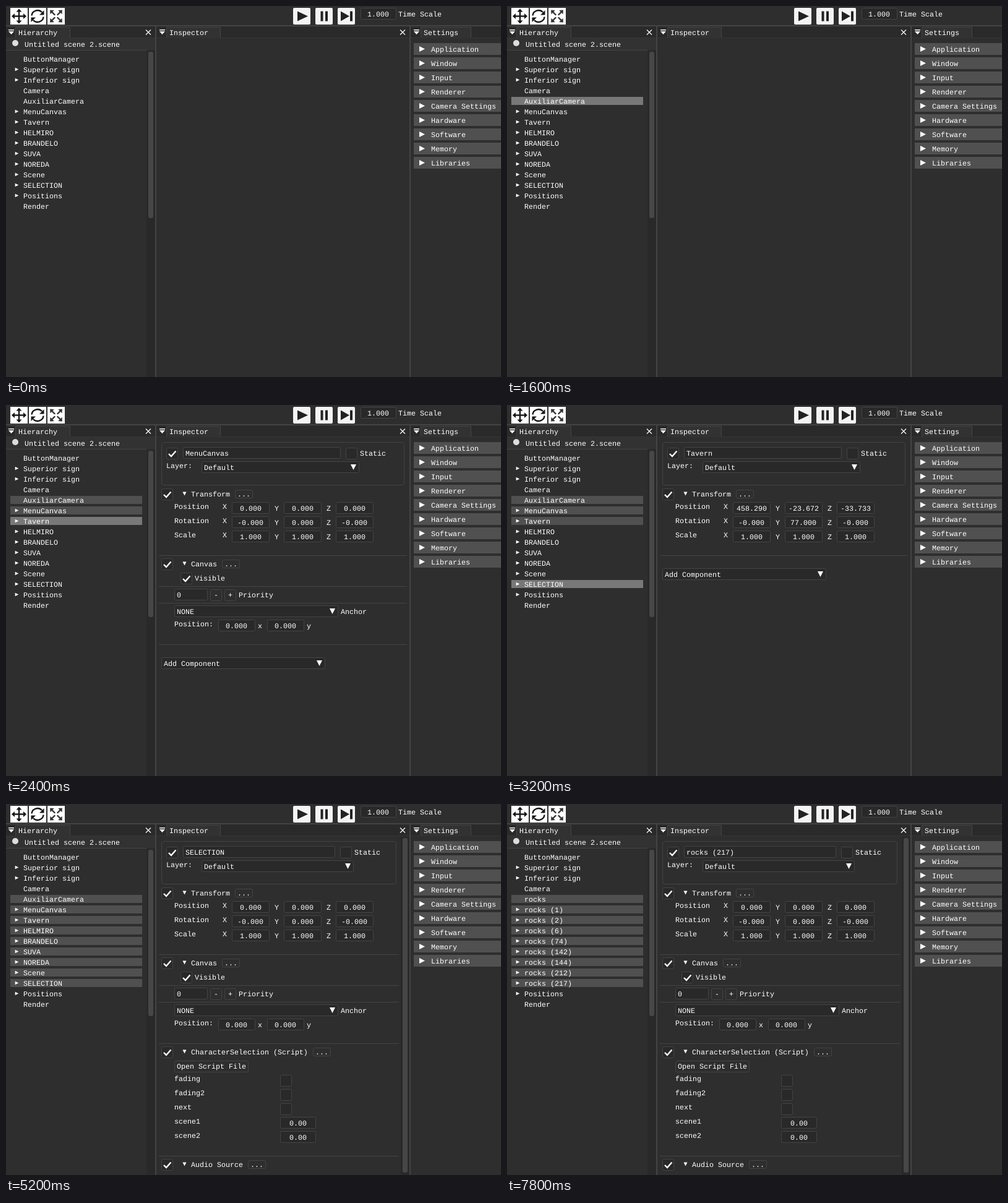
Write an HTML page that moves like this. It is 800 by 600 pixels and loops after 8000 ms.

```html
<!DOCTYPE html>
<html lang="en">
<head>
<meta charset="utf-8">
<title>Scene editor</title>
<style>
html, body { margin: 0; width: 100%; height: 100%; overflow: hidden; background: #2e2e2e; }
svg { display: block; width: 800px; height: 600px; }
text { font: 11.667px "Liberation Mono", monospace; fill: #fff; white-space: pre; text-rendering: geometricPrecision; }
</style>
</head>
<body>
<svg viewBox="0 0 800 600">
  <g id="base"></g>
  <g id="tree"></g>
  <g id="inspector"></g>
</svg>
<script>
const LOOP = 8000, CHAR = 7;
const BG = '#2e2e2e', FRAME = '#292929', BORDER = '#444', HEADER = '#505050', HOVER = '#787878';

// Primitives; text and controls are placed by their vertical centre.
const rect = (x, y, w, h, fill, more = '') =>
  `<rect x="${x}" y="${y}" width="${w}" height="${h}" fill="${fill}" ${more}/>`;
const path = (d, fill = '#fff', more = '') => `<path d="${d}" fill="${fill}" ${more}/>`;
const text = (x, cy, s) => `<text x="${x}" y="${cy + 4}">${s}</text>`;
const box = (x, y, w, h, fill = FRAME, r = 2) =>
  rect(x + .5, y + .5, w - 1, h - 1, fill, `stroke="${BORDER}" rx="${r}"`);
const right = (x, cy, r) => path(`M${x - r} ${cy - r}L${x + r} ${cy}L${x - r} ${cy + r}Z`);
const down = (x, cy, r) => path(`M${x - r} ${cy - r}H${x + r}L${x} ${cy + r}Z`);

// Widgets
const check = (x, cy, on) => box(x, cy - 9, 19, 19) + (on
  ? path(`M${x + 4} ${cy + 1}l4 4 7.5-8.5`, 'none', 'stroke="#fff" stroke-width="2.4"') : '');
const field = (x, cy, s, w = 61) =>
  box(x, cy - 10, w, 19) + text(x + Math.floor((w - s.length * CHAR) / 2), cy, s);
const small = (x, cy, s) => box(x, cy - 7, s.length * CHAR + 8, 14, 'none') + text(x + 4, cy, s);
const button = (x, cy, w, h, s) => box(x, cy - Math.floor(h / 2), w, h, 'none')
  + text(x + Math.max(4, (w - s.length * CHAR) / 2), cy, s);
const combo = (x, cy, w, s) =>
  box(x, cy - 10, w, 19) + text(x + 4, cy, s) + down(x + w - 9.5, cy - .5, 4.5);
const rule = (y, wide) => rect(247, y, wide ? 401 : 388, 1, BORDER);
const component = (cy, title) => check(251, cy, true) + down(288.5, cy - .5, 3)
  + text(299, cy, title) + small(307 + title.length * CHAR, cy, '...');

function tab(x, title, w, close) {
  return rect(x + 16, 34, w, 18, '#323232')
    + path(`M${x + 15.5} 51V34.5H${x + 16.5 + w}V51`, 'none', `stroke="${BORDER}"`)
    + rect(x + 4, 38, 9, 1.5, '#fff') + path(`M${x + 4} 41h9l-4.5 5Z`)
    + text(x + 20, 43, title)
    + (close ? path(`M${close - 4} 38.5l8 8m0-8l-8 8`, 'none', 'stroke="#fff" stroke-width="1.2"') : '');
}

const turns = (list, draw) => list.map(a => `<g transform="rotate(${a})">${draw}</g>`).join('');

function toolbar() {
  const ink = '#161616';
  const arm = rect(-1.2, -10, 2.4, 10, ink) + path('M-4.5-7L0-12L4.5-7Z', ink);
  const spin = path('M-9.5-1A9.5 9 0 0 1 7-6.5', 'none', `stroke="${ink}" stroke-width="2.4"`)
    + path('M10.5-9.5V-2H3Z', ink);
  const grow = rect(-1.2, -10.5, 2.4, 8, '#333') + path('M-4.5-9L0-14L4.5-9Z', '#333');
  const tools = [turns([0, 90, 180, 270], arm), turns([0, 180], spin), turns([45, 135, 225, 315], grow)];
  const plays = [
    path('M-7-8L10 0L-7 8Z', '#222'),
    rect(-5.5, -8, 4, 16, '#222') + rect(2, -8, 4, 16, '#222'),
    path('M-9-8L5 0L-9 8Z', '#222') + rect(6, -8, 4, 16, '#222')
  ];
  return tools.map((s, i) =>
      rect(7 + 30 * i, 3, 28, 27, '#fff') + `<g transform="translate(${21 + 30 * i} 16.5)">${s}</g>`).join('')
    + plays.map((s, i) =>
      rect(464 + 36 * i, 3, 28, 27, '#f4f4f4', 'rx="2"')
      + `<g transform="translate(${478 + 36 * i} 16.5)">${s}</g>`).join('')
    + box(573, 3, 58, 19) + text(584, 13, '1.000') + text(634, 13, 'Time Scale');
}

function base() {
  const settings = ['Application', 'Window', 'Input', 'Renderer', 'Camera Settings',
    'Hardware', 'Software', 'Memory', 'Libraries'];
  return rect(0, 0, 800, 600, BG) + toolbar()
    + rect(0, 33, 800, 18, '#2a2a2a') + rect(0, 31, 800, 2, BORDER) + rect(0, 51, 800, 1, '#363636')
    + rect(0, 52, 241, 19, '#323232') + rect(0, 71, 227, 1, BORDER)
    + rect(227, 72, 14, 528, FRAME) + rect(230, 74, 8, 269, '#474747', 'rx="3"')
    + tab(0, 'Hierarchy', 87, 230) + tab(244, 'Inspector', 86, 641) + tab(655, 'Settings', 80)
    + rect(241, 33, 2, 567, BORDER) + rect(652, 33, 2, 567, BORDER)
    + '<circle cx="15" cy="60" r="5" fill="#ddd"/>' + text(30, 62, 'Untitled scene 2.scene')
    + settings.map((s, i) => rect(659, 60 + 23 * i, 141, 19, HEADER)
      + right(672.5, 69.5 + 23 * i, 4.5) + text(687, 70 + 23 * i, s)).join('');
}

const NAMES = ['ButtonManager', 'Superior sign', 'Inferior sign', 'Camera', 'AuxiliarCamera',
  'MenuCanvas', 'Tavern', 'HELMIRO', 'BRANDELO', 'SUVA', 'NOREDA', 'Scene', 'SELECTION', 'Positions', 'Render'];
const RENAMED = ['', ' (1)', ' (2)', ' (6)', ' (74)', ' (142)', ' (144)', ' (212)', ' (217)'].map(s => 'rocks' + s);
const LEAVES = [0, 3, 4, 14];
const FIRST = 4;

function tree({ selected, hover, renamed }) {
  return NAMES.map((name, i) => {
    const cy = 86 + 17 * i, k = i - FIRST;
    const fill = i === hover ? HOVER : k >= 0 && k < selected ? HEADER : '';
    return (fill && rect(7, cy - 7, 213, 13, fill))
      + (LEAVES.includes(i) ? '' : right(17.5, cy - .5, 2.8))
      + text(28, cy, renamed && RENAMED[k] || name);
  }).join('');
}

function transform(wide, values) {
  return component(144, 'Transform')
    + ['Position', 'Rotation', 'Scale'].map((label, r) => {
      const cy = 164 + 23 * r;
      return text(272, cy, label) + text(350, cy, 'X') + text(434, cy + 3, 'Y') + text(518, cy + 3, 'Z')
        + [0, 1, 2].map(c => field(365 + 84 * c, cy + 3, values[3 * r + c])).join('');
    }).join('') + rule(243, wide);
}

const canvas = wide => component(257, 'Canvas') + check(282, 280, true) + text(305, 280, 'Visible')
  + rule(293, wide) + box(272, 297, 54, 19) + text(276, 307, '0')
  + button(330, 307, 19, 19, '-') + button(353, 307, 19, 19, '+') + text(376, 307, 'Priority')
  + rule(320, wide) + combo(272, 334, 265, 'NONE') + text(541, 334, 'Anchor')
  + text(272, 354, 'Position:') + field(343, 357, '0.000', 60) + text(407, 357, 'x')
  + field(422, 357, '0.000', 60) + text(486, 357, 'y') + rule(387, wide);

const addComponent = cy => combo(251, cy, 265, 'Add Component');

const ZERO = '0.000 0.000 0.000 -0.000 0.000 -0.000 1.000 1.000 1.000';
const PANELS = {
  camera: {
    values: '97.357 -41.935 -76.645 -180.000 3.167 180.000 1.000 1.000 1.000', grab: 396,
    body: wide => component(257, 'Camera')
      + check(272, 280) + text(295, 280, 'Active Camera')
      + check(272, 303) + text(295, 303, 'Culling Camera')
      + text(272, 323, 'FOV') + field(301, 326, '49.663') + small(370, 326, 'DefFOV')
      + text(272, 346, 'Camera Planes') + field(371, 349, '0.100') + field(440, 349, '1000.000')
      + small(509, 349, 'DefPlanes')
      + text(272, 369, 'Aspect Ratio') + field(364, 372, '1.996') + small(433, 372, 'DefAR')
      + button(272, 398, 151, 25, 'Custom Default Values') + button(430, 398, 150, 25, 'Default Values')
      + rule(431, wide) + component(445, 'Mesh Renderer')
      + ['Vertex Normals', 'Face Normals', 'Checkers'].map((s, i) =>
        check(272 + 129 * i, 468) + text(295 + 129 * i, 468, s)).join('')
      + rule(498, wide) + text(272, 526, 'Shadowing')
      + ['Cast', 'Receive', 'Only'].map((s, i) => text(272, 543 + 23 * i, s + ' Shadows')
        + check(i === 1 ? 385 : 364, 546 + 23 * i, i < 2)).join('')
  },
  menu: { values: ZERO, body: wide => canvas(wide) + addComponent(418) },
  tavern: {
    values: '458.290 -23.672 -33.733 -0.000 77.000 -0.000 1.000 1.000 1.000',
    body: () => addComponent(274)
  },
  selection: {
    values: ZERO, grab: 541,
    body: wide => canvas(wide) + component(401, 'CharacterSelection (Script)')
      + button(272, 424, 120, 19, 'Open Script File')
      + ['fading', 'fading2', 'next', 'scene1', 'scene2'].map((s, i) => text(272, 444 + 23 * i, s)
        + (i < 3 ? check(443, 447 + 23 * i) : field(443, 447 + 23 * i, '0.00', 58))).join('')
      + rule(569, wide) + component(583, 'Audio Source')
  }
};

function inspector({ panel, name, wide, marked, caret }) {
  if (!panel) return '';
  const { values, grab, body } = PANELS[panel];
  const dx = wide ? 9 : 0, end = 290 + name.length * CHAR;
  return box(251, 60, wide ? 393 : 380, 70, 'none', 4)
    + check(259, 78, true) + box(286, 68, 246 + dx, 19)
    + (marked ? rect(290, 70, end - 290, 16, '#fff', 'fill-opacity=".156"') : '')
    + text(290, 78, name) + (caret ? rect(end, 72, 1, 11, '#fff') : '')
    + check(540 + dx, 78) + text(563 + dx, 78, 'Static')
    + text(259, 98, 'Layer:') + combo(316, 101, 246 + dx, 'Default')
    + transform(wide, values.split(' ')) + body(wide)
    + (wide ? '' : rect(638, 52, 14, 548, FRAME) + rect(641, 55, 8, grab, '#474747', 'rx="3"'));
}

// Each step changes only the listed parts of the state.
const STEPS = [
  [0, { selected: 0, hover: -1, panel: '', name: '' }],
  [1000, { hover: 3 }],
  [1200, { hover: 4 }],
  [1400, { hover: -1 }],
  [1600, { hover: 4 }],
  [1800, { selected: 1, panel: 'camera', name: 'AuxiliarCamera', wide: true }],
  [2000, { hover: 5, wide: false }],
  [2400, { selected: 2, hover: 6, panel: 'menu', name: 'MenuCanvas', wide: true }],
  [2800, { selected: 3, hover: -1, panel: 'tavern', name: 'Tavern' }],
  [3200, { hover: 12 }],
  [3600, { selected: 9, panel: 'selection', name: 'SELECTION', wide: false }],
  [4200, { hover: 13 }],
  [4400, { hover: -1 }],
  [5000, { hover: 12 }],
  [5200, { hover: -1 }],
  [5800, { marked: true, caret: true }],
  [6800, { caret: false }],
  [7200, { marked: false, caret: true, name: 'r' }],
  [7400, { name: 'roc' }],
  [7600, { name: 'rocks' }],
  [7800, { name: 'rocks (217)', caret: false, renamed: true }]
];

const layer = id => document.getElementById(id);
let shown = -1;

function draw(now) {
  const t = now % LOOP;
  const step = STEPS.filter(([at]) => at <= t).length;
  if (step !== shown) {
    shown = step;
    const state = Object.assign({}, ...STEPS.slice(0, step).map(s => s[1]));
    layer('tree').innerHTML = tree(state);
    layer('inspector').innerHTML = inspector(state);
  }
}

layer('base').innerHTML = base();
const start = performance.now();
function tick() {
  draw(performance.now() - start);
  requestAnimationFrame(tick);
}
tick();
</script>
</body>
</html>
```
